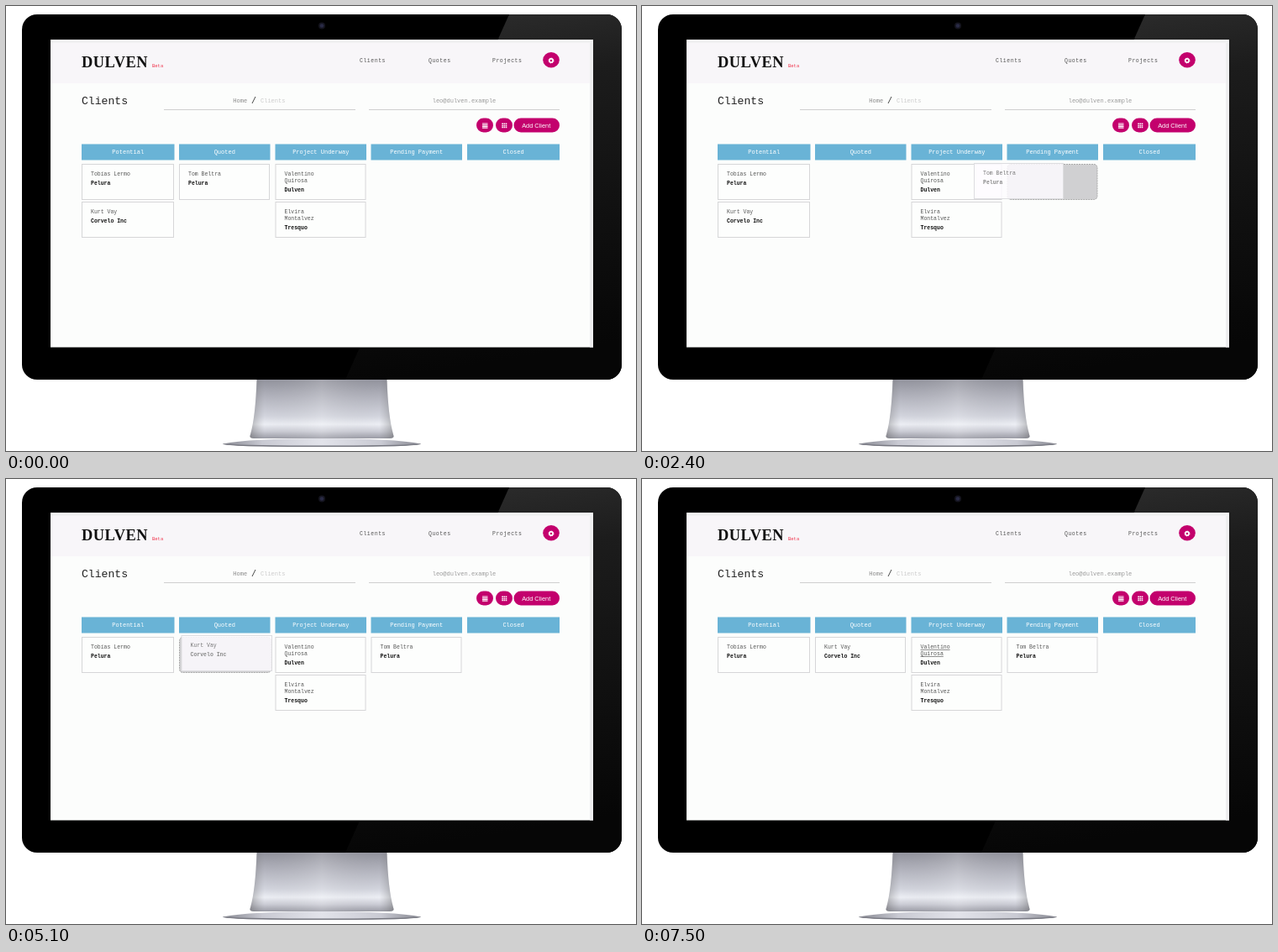
These frames come from a looping animation (750x530 px, 8 s). An HTML page:

```html
<!DOCTYPE html>
<html lang="en">
<head>
<meta charset="utf-8">
<title>Client board</title>
<style>
  html, body { margin: 0; width: 100%; height: 100%; overflow: hidden; background: #fff; }
  svg { display: block; width: 750px; height: 530px; }
  text { font-family: "Liberation Mono", "Courier New", monospace; font-size: 7px; fill: #444; white-space: pre; }
  .mid { text-anchor: middle; }
  .nav { font-size: 6.5px; letter-spacing: .53px; fill: #555; }
  .head { fill: #fff; text-anchor: middle; }
  .name { font-size: 6.5px; fill: #555; }
  .firm { font-size: 6.5px; font-weight: bold; fill: #111; }
  .dragged .name { fill: #777; }
  .dragged .firm { fill: #8a8a8a; }
  .link { text-decoration: underline; }
  .brand { font: bold 18.4px "Liberation Serif", serif; letter-spacing: .5px; fill: #111; }
  .button { font: 7.4px "Liberation Sans", sans-serif; fill: #fff; text-anchor: middle; }
  .pill { fill: #c3006d; }
</style>
</head>
<body>
<svg viewBox="0 0 750 530">
  <defs>
    <linearGradient id="glare" x1="0" y1="0" x2=".12" y2="1">
      <stop offset="0" stop-color="#303030"/>
      <stop offset=".25" stop-color="#1c1c1c"/>
      <stop offset="1" stop-color="#060606"/>
    </linearGradient>
    <linearGradient id="neck" x1="0" y1="0" x2="0" y2="1">
      <stop offset="0" stop-color="#92939d"/>
      <stop offset=".3" stop-color="#b3b4be"/>
      <stop offset=".62" stop-color="#d2d4dd"/>
      <stop offset=".76" stop-color="#eceef4"/>
      <stop offset=".88" stop-color="#cbccd5"/>
      <stop offset="1" stop-color="#9a9ba5"/>
    </linearGradient>
    <linearGradient id="sides">
      <stop offset="0" stop-color="#555" stop-opacity=".4"/>
      <stop offset=".1" stop-color="#888" stop-opacity="0"/>
      <stop offset=".5" stop-color="#fff" stop-opacity=".16"/>
      <stop offset=".9" stop-color="#888" stop-opacity="0"/>
      <stop offset="1" stop-color="#555" stop-opacity=".4"/>
    </linearGradient>
    <linearGradient id="base">
      <stop offset="0" stop-color="#85868f"/>
      <stop offset=".2" stop-color="#c9cad3"/>
      <stop offset=".5" stop-color="#e2e3ea"/>
      <stop offset=".8" stop-color="#c9cad3"/>
      <stop offset="1" stop-color="#85868f"/>
    </linearGradient>
    <clipPath id="case"><rect x="19" y="10" width="714" height="435" rx="18"/></clipPath>
  </defs>

  <!-- monitor -->
  <path d="M258 521.5Q290 515 376 515T494 521.5Q490 525 376 525T258 521.5Z" fill="url(#base)"/>
  <path d="M258 521.5Q262 525 376 525T494 521.5Q460 523.5 376 523.5T258 521.5Z" fill="#777881"/>
  <g id="stand"></g>
  <g clip-path="url(#case)">
    <path d="M19 10H733V445H19Z"/>
    <path d="M599 10H733V445H404Z" fill="url(#glare)"/>
  </g>
  <circle cx="376" cy="23.5" r="4" fill="#15151f"/>
  <circle cx="376" cy="23.5" r="2.3" fill="#292a45"/>

  <!-- page -->
  <path d="M53 40H699V406.5H53Z" fill="#fcfdfc"/>
  <path d="M53 44H695V92H53Z" fill="#f8f6f9"/>
  <path d="M53 40H699V44H53Z" fill="#f2f2f3"/>
  <path d="M695 44H699V406.5H695Z" fill="#eeeeef"/>

  <text class="brand" x="90" y="73">DULVEN</text>
  <text x="174" y="73" style="font-size:5.5px;fill:#f0324b">Beta</text>
  <text class="nav" x="421" y="67">Clients</text>
  <text class="nav" x="503" y="67">Quotes</text>
  <text class="nav" x="579" y="67">Projects</text>
  <ellipse class="pill" cx="649" cy="64.3" rx="9.8" ry="9.2"/>
  <circle cx="649" cy="65" r="2.1" fill="none" stroke="#fff" stroke-width="1.7"/>
  <circle cx="649" cy="65" r="3" fill="none" stroke="#fff" stroke-width="1" stroke-dasharray="1.18 1.18"/>

  <text x="90" y="117" style="font-size:13.1px;fill:#222">Clients</text>
  <text x="270.3" y="115" style="fill:#888">Home</text>
  <text x="292" y="116" style="font-size:10px;fill:#333">/</text>
  <text x="303" y="115" style="fill:#ccc">Clients</text>
  <text class="mid" x="545.5" y="115" style="fill:#999">leo@dulven.example</text>
  <path d="M188 123.5H416M432 123.5H659" stroke="#cfcfcf"/>

  <rect class="pill" x="560" y="133.5" width="20" height="17" rx="8.5"/>
  <rect class="pill" x="583" y="133.5" width="20" height="17" rx="8.5"/>
  <rect class="pill" x="604.5" y="133.5" width="54.5" height="17" rx="8.5"/>
  <path d="M567 140H573.5M567 141.7H573.5M567 143.4H573.5M567 145.1H573.5" stroke="#fff" stroke-width="1.1"/>
  <path d="M590.3 140.2H596.3M590.3 142.4H596.3M590.3 144.6H596.3" stroke="#fff" stroke-width="1.5" stroke-dasharray="1.6 .6"/>
  <text class="button" x="631.2" y="145">Add Client</text>

  <g id="heads"></g>
  <g id="board"></g>
</svg>

<script>
const LOOP = 8000, STEP = 100, CARD_H = 42, ROW = 45, TOP = 188.5;

const columns = [
  { title: "Potential", x: 90, w: 110.5 },
  { title: "Quoted", x: 206, w: 108.5 },
  { title: "Project Underway", x: 320.5, w: 108.5 },
  { title: "Pending Payment", x: 434.5, w: 108.5 },
  { title: "Closed", x: 549, w: 110 },
];

const people = {
  tobias: { lines: ["Tobías Lermo"], firm: "Pelura" },
  kurt: { lines: ["Kurt Vay"], firm: "Corvelo Inc" },
  tom: { lines: ["Tom Beltra"], firm: "Pelura" },
  valentino: { lines: ["Valentino", "Quirosa"], firm: "Dulven" },
  elvira: { lines: ["Elvira", "Montalvez"], firm: "Tresquo" },
};

// Each point is [time, x, y]; the card is dropped at `end`.
const drags = [
  { who: "tom", from: 1, to: 3, start: 2200, end: 2800, w: 106,
    path: [[2200, 214, 187.5], [2300, 305, 187.5], [2400, 395.5, 187.5], [2500, 426, 187], [2600, 437, 187]],
    slotAt: t => t < 2300 ? 1 : t < 2400 ? 2 : 3 },
  { who: "kurt", from: 0, to: 1, start: 4800, end: 5500, w: 107.5,
    path: [[4800, 143.5, 211.5], [4900, 176, 197], [5000, 199, 189], [5100, 209, 186.5]],
    slotAt: () => 1 },
];

const byId = id => document.getElementById(id);

function along(path, t) {
  const i = path.findIndex(p => p[0] > t);
  if (i < 0) return path[path.length - 1].slice(1);
  if (i === 0) return path[0].slice(1);
  const [a, b] = [path[i - 1], path[i]];
  const k = (t - a[0]) / (b[0] - a[0]);
  return [a[1] + (b[1] - a[1]) * k, a[2] + (b[2] - a[2]) * k];
}

function card(who, x, y, w, { dragged = false, linked = false } = {}) {
  const { lines, firm } = people[who];
  const names = lines.map((line, i) =>
    `<text class="name${linked ? " link" : ""}" x="${x + 10.5}" y="${y + 13.7 + i * 8}">${line}</text>`).join("");
  return `<g class="${dragged ? "dragged" : ""}">
    <rect x="${x}" y="${y}" width="${w}" height="${CARD_H}" fill="${dragged ? "#fefcff" : "#fdfefd"}"
      fill-opacity="${dragged ? .84 : 1}" stroke="${dragged ? "#dddde0" : "#d6d6d8"}"/>
    ${names}<text class="firm" x="${x + 10.5}" y="${y + 16.2 + lines.length * 8}">${firm}</text></g>`;
}

const slot = (x, y, w) =>
  `<rect x="${x}" y="${y}" width="${w}" height="${CARD_H}" rx="4" fill="#d0d0d2" stroke="#aaa" stroke-dasharray="2 1"/>`;

function render(t) {
  const lists = [["tobias", "kurt"], ["tom"], ["valentino", "elvira"], [], []];
  let held = "";
  for (const d of drags) {
    if (t < d.start) continue;
    lists[d.from] = lists[d.from].filter(who => who !== d.who);
    if (t >= d.end) {
      lists[d.to].unshift(d.who);
    } else {
      lists[d.slotAt(t)].unshift("slot");
      held = card(d.who, ...along(d.path, t), d.w, { dragged: true });
    }
  }
  byId("board").innerHTML = lists.map((list, c) => list.map((who, row) => {
    const x = columns[c].x + .5, y = TOP + row * ROW, w = columns[c].w - 1.5;
    return who === "slot" ? slot(x, y, w + (c === 1 ? 2 : 0))
      : card(who, x, y, w, { linked: who === "valentino" && t >= 6300 });
  }).join("")).join("") + held;
}

byId("heads").innerHTML = columns.map(({ title, x, w }) =>
  `<rect x="${x}" y="164.5" width="${w}" height="19" fill="#69b3d6"/>
   <text class="head" x="${x + w / 2}" y="176.3">${title}</text>`).join("");

byId("stand").innerHTML = ["neck", "sides"].map(fill =>
  `<path d="M298.500 445H453.500Q455 490 461.500 512Q462 515 457 515H295Q290 515 290.500 512Q297 490 298.500 445Z" fill="url(#${fill})"/>`).join("");

let shown = -1;
function tick() {
  const t = Math.floor(performance.now() % LOOP / STEP) * STEP;
  if (t !== shown) render(shown = t);
  requestAnimationFrame(tick);
}
tick();
</script>
</body>
</html>
```
